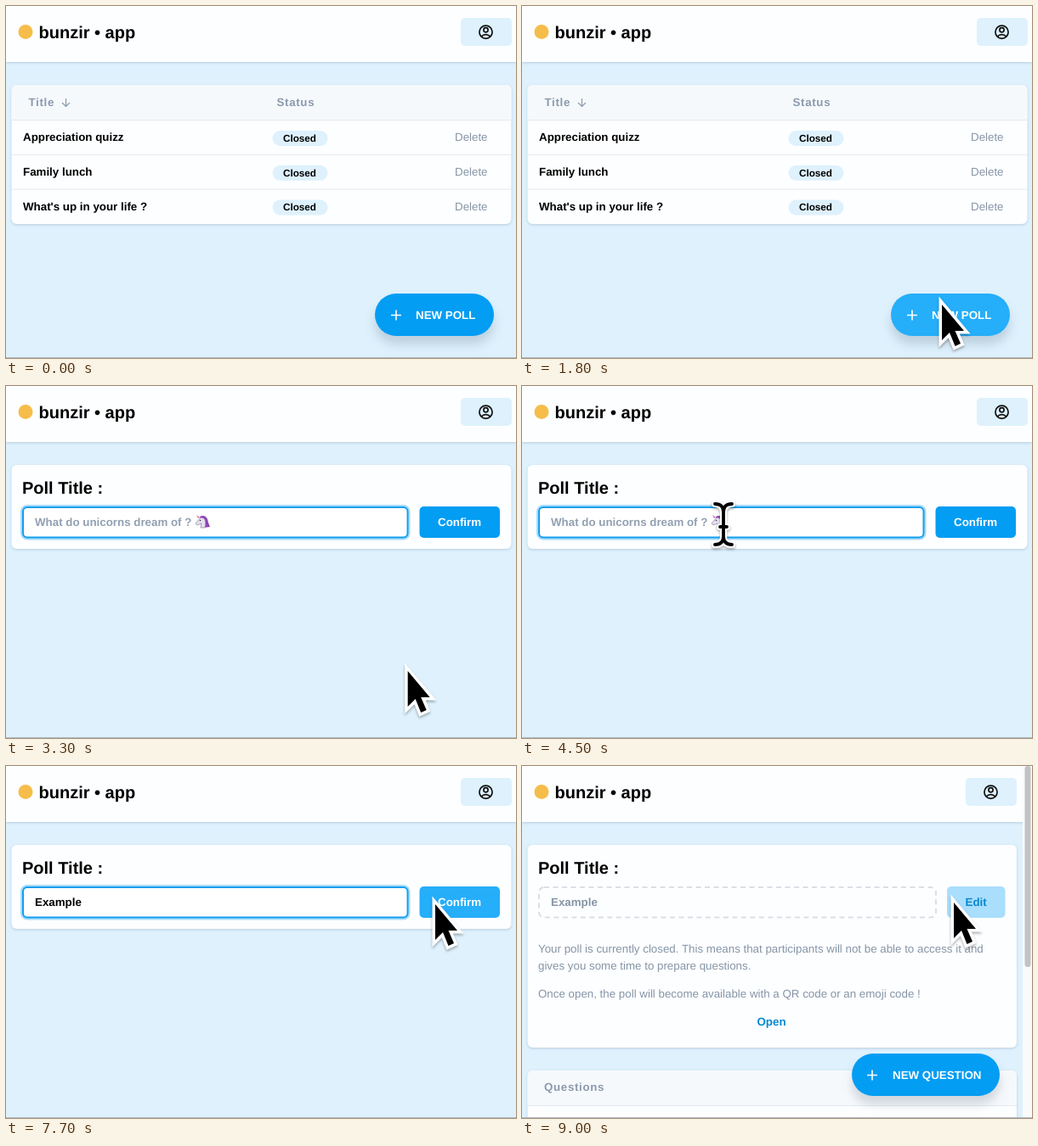
Animation, 600 px wide and 415 px high, one loop 9.1 s. Source, as an HTML page:

```html
<!DOCTYPE html>
<html lang="en">
<head>
<meta charset="utf-8">
<title>Poll app walkthrough</title>
<style>
html, body { margin: 0; width: 100%; height: 100%; overflow: hidden; background: #def1fd; }
svg { display: block; width: 600px; height: 415px; }
text { font: 13.33px "Liberation Sans", Arial, sans-serif; white-space: pre; text-rendering: geometricPrecision; }
.b { font-weight: 700; }
.h { font-size: 20px; font-weight: 700; }
.s { font-size: 11.7px; font-weight: 700; }
.g { fill: #8695a7; }
.th { font-weight: 700; letter-spacing: .67px; fill: #8b9aac; }
.w { fill: #fff; }
.card { fill: #fdfeff; filter: drop-shadow(0 1px 1.5px rgba(30, 60, 90, .2)); }
.pale { fill: #def1fd; }
.blue { fill: #039df3; }
.hover { fill: #25aef9; }
.float { filter: drop-shadow(0 10px 6px rgba(30, 50, 70, .17)); }
.line { stroke: #e3e9ef; }
.icon { fill: none; stroke: #fff; stroke-width: 1.6; }
.cursor { filter: drop-shadow(0 2px 1.5px rgba(0, 0, 0, .3)); }
</style>
</head>
<body>
<svg viewBox="0 0 600 415">
  <defs>
    <path id="beamShape" d="M-10-24Q0-24 0-14V14Q0 24-10 24M10-24Q0-24 0-14M0 14Q0 24 10 24M-4 3H4"/>
  </defs>
  <rect class="pale" width="600" height="415"/>

  <g id="list">
    <rect class="card" x="6.5" y="93" width="588" height="164" rx="6"/>
    <path d="M6.5 134V99a6 6 0 0 1 6-6h576a6 6 0 0 1 6 6v35z" fill="#f6f9fc"/>
    <text class="th" x="26.5" y="117.5">Title</text>
    <path d="M70.5 109v9.5M66 114l4.5 4.5 4.5-4.5" fill="none" stroke="#8b9aac" stroke-width="1.2"/>
    <text class="th" x="318.5" y="117.5">Status</text>
    <g id="rows"></g>
    <g class="float"><rect id="newPoll" x="434" y="339" width="140" height="50" rx="25"/></g>
    <path class="icon" d="M453 364.5h12M459 358.5v12"/>
    <text class="b w" x="482" y="368.5">NEW POLL</text>
  </g>

  <g id="form">
    <rect class="card" x="6.5" y="93" width="588" height="99" rx="6"/>
    <text class="h" x="19" y="127">Poll Title :</text>
    <rect x="19" y="142" width="454.5" height="37.5" rx="6" fill="none" stroke="#a9dbf9" stroke-width="4"/>
    <rect x="20" y="143" width="452.5" height="35.5" rx="5" fill="#fff" stroke="#129fef" stroke-width="2"/>
    <g id="hint">
      <text class="b" x="34" y="164.5" fill="#91a0b1">What do unicorns dream of ?</text>
      <path d="M228 154q6-3 9 3 1 5 3 9l-7 1q1-5-4-8z" fill="#8d45b8"/>
      <path d="M229 155l4 1q3 4 1 11h-5l1-5-5 2-2-2z" fill="#e6dff0" stroke="#7b6b91" stroke-width=".6"/>
      <path d="M228 155l-4-3 2 4z" fill="#e064a8"/>
      <circle cx="228.5" cy="158.5" r=".8" fill="#333"/>
    </g>
    <text class="b" id="typed" x="34" y="164.5"></text>
    <path id="caret" d="M0 151v20" stroke="#111"/>
    <rect id="confirm" x="486.5" y="142" width="94.5" height="37" rx="5"/>
    <text class="b w" x="508" y="164.5">Confirm</text>
  </g>

  <g id="detail">
    <rect class="card" x="6.5" y="93" width="575.5" height="239" rx="6"/>
    <text class="h" x="19" y="127">Poll Title :</text>
    <rect x="20" y="143" width="467" height="35.5" rx="6" fill="none" stroke="#d9dfe6" stroke-width="2" stroke-dasharray="6 4.5"/>
    <text class="b g" x="34" y="164.5">Example</text>
    <rect x="500" y="142" width="68.5" height="37" rx="5" fill="#a9defc"/>
    <text class="b" x="521.5" y="164.5" fill="#0788d1">Edit</text>
    <text class="g" x="19" y="220">Your poll is currently closed. This means that participants will not be able to access it and</text>
    <text class="g" x="19" y="240">gives you some time to prepare questions.</text>
    <text class="g" x="19" y="273">Once open, the poll will become available with a QR code or an emoji code !</text>
    <text class="b" x="293.5" y="306" text-anchor="middle" fill="#0788d1">Open</text>
    <rect class="card" x="6.5" y="359" width="575.5" height="70" rx="6"/>
    <path d="M6.5 400v-35a6 6 0 0 1 6-6h563.5a6 6 0 0 1 6 6v35z" fill="#f6f9fc"/>
    <path class="line" d="M6.5 400.5h575.5"/>
    <text class="th" x="26" y="382.5">Questions</text>
    <rect class="blue float" x="388" y="339" width="174" height="50" rx="25"/>
    <path class="icon" d="M406 364.5h12M412 358.5v12"/>
    <text class="b w" x="436" y="368.5">NEW QUESTION</text>
  </g>

  <rect class="card" y="-5" width="600" height="71"/>
  <circle cx="23" cy="30.5" r="8.5" fill="#f6bd4a"/>
  <text class="h" x="38.5" y="37.5">bunzir • app</text>
  <g id="account">
    <rect class="pale" x="535" y="14" width="60" height="33" rx="5"/>
    <g fill="none" stroke="#111" stroke-width="1.7">
      <circle cx="564.5" cy="30.7" r="7.6"/>
      <circle cx="564.5" cy="28.2" r="2.6"/>
      <path d="M559 36.2q5.5-5 11 0"/>
    </g>
  </g>
  <g id="scrollbar">
    <rect x="589" width="11" height="415" fill="#fafafa"/>
    <rect x="591.5" y="0" width="7" height="237" rx="3.5" fill="#c1c2c4"/>
  </g>
  <path d="M0 414.5h600" stroke="#aebbc5"/>

  <g id="arrow" class="cursor">
    <path d="M0 0V42L9 33 15.5 49 22 46 15.5 31H26Z" stroke="#fff" stroke-width="7" paint-order="stroke"/>
  </g>
  <g id="beam" class="cursor" fill="none" stroke-linecap="round">
    <use href="#beamShape" stroke="#fff" stroke-width="8"/>
    <use href="#beamShape" stroke="#000" stroke-width="3.8"/>
  </g>
</svg>
<script>
const LOOP = 9100, STEP = 100;
const FORM_AT = 2300, TYPE_AT = 5200, TYPED_AT = 5900, MOVE_AT = 6900, DETAIL_AT = 8400;
const WORD = 'Example', BLINK = 1200;
// Pointer path: time, x, y
const path = [
  [600, -40, 250], [1200, 387, 315], [1500, 470, 344], [1700, 494, 352],
  [3200, 494, 352], [3500, 430, 304], [3900, 285, 200], [4300, 237, 163],
  [MOVE_AT, 237, 163], [7200, 385, 170], [7600, 505, 163],
  [8400, 505, 163], [8700, 508, 161], [LOOP, 508, 161]
];
const el = id => document.getElementById(id);
const show = (id, on) => el(id).style.display = on ? '' : 'none';
const move = (id, x, y) => el(id).setAttribute('transform', `translate(${x} ${y})`);
const inside = (x, y, l, t, r, b) => x > l && x < r && y > t && y < b;
const paint = (id, hot) => el(id).setAttribute('class', hot ? 'hover' : 'blue');

el('rows').innerHTML = ['Appreciation quizz', 'Family lunch', "What's up in your life ?"].map((title, i) => `
  <g transform="translate(0 ${134.5 + i * 40.8})">
    <path class="line" d="M6.5 0h588"/>
    <text class="b" x="20" y="24.6">${title}</text>
    <rect class="pale" x="313.5" y="12.5" width="65" height="18" rx="9"/>
    <text class="s" x="326" y="25.3">Closed</text>
    <text class="g" x="528" y="24.6">Delete</text>
  </g>`).join('');

function pointer(t) {
  const i = Math.max(1, path.findIndex(p => p[0] > t));
  const [t0, x0, y0] = path[i - 1], [t1, x1, y1] = path[i];
  const k = Math.max(0, (t - t0) / (t1 - t0));
  return [x0 + (x1 - x0) * k, y0 + (y1 - y0) * k];
}

function draw(t) {
  const form = t >= FORM_AT && t < DETAIL_AT, detail = t >= DETAIL_AT;
  show('list', t < FORM_AT);
  show('form', form);
  show('detail', detail);
  show('scrollbar', detail);
  move('account', detail ? -13 : 0, 0);

  const [x, y] = pointer(t);
  const visible = t >= 600 && (t < TYPE_AT || t >= MOVE_AT);
  const overInput = form && inside(x, y, 18, 141, 474, 180);
  show('arrow', visible && !overInput);
  show('beam', visible && overInput);
  move('arrow', x, y);
  move('beam', x, y);
  paint('newPoll', inside(x, y, 434, 339, 574, 389));
  paint('confirm', inside(x, y, 487, 142, 581, 179));

  const count = Math.max(0, Math.min(WORD.length, Math.floor((t - TYPE_AT) / 115) + 1));
  el('typed').textContent = WORD.slice(0, count);
  show('hint', !count);
  const typing = t >= TYPE_AT && t < TYPED_AT;
  const blink = t - (t < TYPE_AT ? FORM_AT : TYPED_AT);
  show('caret', typing || blink % BLINK < BLINK / 2);
  move('caret', 34.5 + (count && form ? el('typed').getComputedTextLength() : 0), 0);
}

function tick() {
  draw(Math.floor(performance.now() % LOOP / STEP) * STEP);
  requestAnimationFrame(tick);
}
tick();
</script>
</body>
</html>
```
